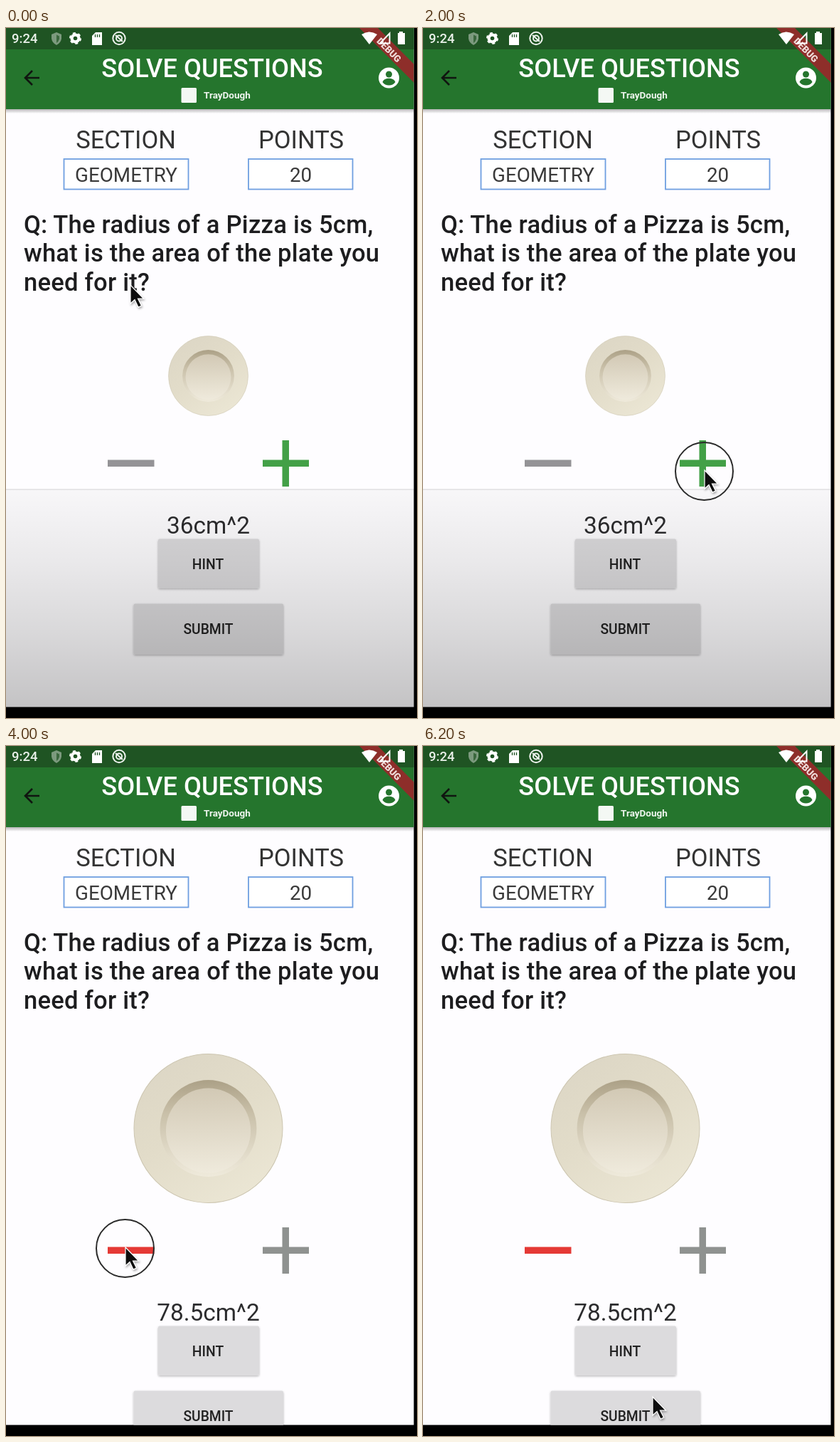
Recreate the animation shown at these times as an HTML page. Size 578 px wide and 969 px high, loop 6.3 s.

```html
<!DOCTYPE html>
<html lang="en">
<head>
<meta charset="utf-8">
<title>Solve questions</title>
<style>
  html, body { margin: 0; width: 100%; height: 100%; overflow: hidden; background: #000; }
  svg { display: block; width: 578px; height: 969px; font-family: Roboto, sans-serif; }
  #app { filter: blur(.55px); }
  .mid { text-anchor: middle; }
  .med { font-weight: 500; }
  .label { font-size: 34.6px; fill: #333; }
  .field { font-size: 27.8px; fill: #3a3a3a; }
  .box { fill: #fff; stroke: #6f9fe0; stroke-width: 1.8; }
  .question { font-size: 34.6px; letter-spacing: .22px; fill: #1d1d1f; }
  .area { font-size: 33.4px; fill: #2c2c2e; }
  .button { font-size: 19.3px; fill: #222; }
</style>
</head>
<body>
<svg viewBox="0 0 578 969">
  <defs>
    <linearGradient id="rim" x1=".1" y1="0" x2=".7" y2="1">
      <stop offset="0" stop-color="#dcd6c5"/>
      <stop offset=".5" stop-color="#e2dcc9"/>
      <stop offset="1" stop-color="#ebe6d4"/>
    </linearGradient>
    <linearGradient id="wall" x1="0" y1="0" x2="0" y2="1">
      <stop offset="0" stop-color="#aca187"/>
      <stop offset=".35" stop-color="#c9c0a9"/>
      <stop offset="1" stop-color="#efeadb"/>
    </linearGradient>
    <linearGradient id="well" x1="0" y1="0" x2="0" y2="1">
      <stop offset="0" stop-color="#d2c9b5"/>
      <stop offset="1" stop-color="#efeadc"/>
    </linearGradient>
    <linearGradient id="dim" x1="0" y1="0" x2="0" y2="1">
      <stop offset="0" stop-opacity=".025"/>
      <stop offset=".33" stop-opacity=".08"/>
      <stop offset=".65" stop-opacity=".145"/>
      <stop offset="1" stop-opacity=".23"/>
    </linearGradient>
    <linearGradient id="drop" x1="0" y1="0" x2="0" y2="1">
      <stop offset="0" stop-opacity=".28"/>
      <stop offset="1" stop-opacity="0"/>
    </linearGradient>
    <filter id="lift" x="-10%" y="-10%" width="120%" height="130%">
      <feDropShadow dx="0" dy="1.500" stdDeviation="1.5" flood-opacity=".3"/>
    </filter>
    <filter id="soft" x="-50%" y="-50%" width="200%" height="200%">
      <feDropShadow dx="1" dy="2" stdDeviation="1.5" flood-opacity=".35"/>
    </filter>
    <clipPath id="screen"><rect width="573.500" height="953.500"/></clipPath>
  </defs>

  <g id="app"><g clip-path="url(#screen)">
    <rect width="574" height="954" fill="#fefdff"/>
    <rect y="114" width="574" height="6" fill="url(#drop)"/>

    <text class="mid label" x="168.5" y="168.5">SECTION</text>
    <text class="mid label" x="415" y="168.5">POINTS</text>
    <rect class="box" x="81.5" y="184" width="175" height="42.5"/>
    <rect class="box" x="341" y="184" width="146.500" height="42.5"/>
    <text class="mid field" x="169" y="216">GEOMETRY</text>
    <text class="mid field" x="414.500" y="216">20</text>
    <g class="med question">
      <text x="25" y="287.500">Q: The radius of a Pizza is 5cm,</text>
      <text x="25" y="328">what is the area of the plate you</text>
      <text x="25" y="368.500">need for it?</text>
    </g>

    <g id="plate">
      <circle r="100" fill="url(#rim)" stroke="#cdc6b1" stroke-width="1"/>
      <circle r="65" fill="url(#wall)"/>
      <circle cy="3" r="57" fill="url(#well)"/>
    </g>

    <g id="controls">
      <circle id="ripple" cy="611.500"/>
      <path id="minus" d="M143 606.500h65.500v9.500h-65.500z"/>
      <path id="plus" d="M361 606.500h27.500v-27.500h9.500v27.500h28v9.500h-28v28h-9.500v-28h-27.500z"/>
      <text id="area" class="mid area" x="284.500" y="710"></text>
      <g fill="#dcdbdd" filter="url(#lift)">
        <rect x="214" y="717.500" width="142" height="69" rx="2"/>
        <rect x="179.500" y="808.500" width="210.500" height="71" rx="2"/>
      </g>
      <text class="mid med button" x="284" y="760">HINT</text>
      <text class="mid med button" x="284.500" y="850.500">SUBMIT</text>
    </g>

    <g id="shade">
      <rect y="648" width="574" height="306" fill="url(#dim)"/>
      <path d="M0 648h574" stroke="#000" stroke-opacity=".17"/>
    </g>

    <rect width="574" height="114" fill="#25752d"/>
    <rect width="574" height="30" fill="#1f5423"/>
    <text class="mid med" x="290" y="69" font-size="36.200" fill="#fff">SOLVE QUESTIONS</text>
    <rect x="246.500" y="84" width="21.500" height="21" rx="1.500" fill="#f4f8f4"/>
    <text x="278" y="98.500" font-size="13.500" font-weight="700" fill="#eef5ee">TrayDough</text>
    <path d="M47 70h-20m10-10l-10 10l10 10" fill="none" stroke="#101510" stroke-width="2.600"/>
    <circle cx="538.500" cy="70" r="14.500" fill="#fff"/>
    <circle cx="538.500" cy="65" r="4.500" fill="#25752d"/>
    <path d="M529.500 76c2-7 16-7 18 0c-4 6-14 6-18 0z" fill="#25752d"/>

    <path d="M497 0h26l51 51v26z" fill="#8e2e2a"/>
    <text class="mid" transform="translate(538.500 31) rotate(45)" y="4.500" font-size="13.200" font-weight="800" fill="#f0dcda">DEBUG</text>

    <g fill="#fff">
      <text class="med" x="8" y="21" font-size="18.500" fill="#e9f0e9">9:24</text>
      <path d="M71 6l7 3v6q-1 6-7 9q-6-3-7-9v-6z" fill="#7c9a7e"/>
      <path d="M71 9.500l4 2v4q-1 3.500-4 5.500z" fill="#3b683e"/>
      <circle cx="97.500" cy="14.500" r="7" stroke="#fff" stroke-width="3" stroke-dasharray="3.700 3.630"/>
      <circle cx="97.500" cy="14.500" r="2.800" fill="#1f5423"/>
      <path d="M126 6h9v18h-14v-13z"/>
      <path d="M125.500 9v4m3-4v4m3-4v4" stroke="#1f5423" stroke-width="1.300"/>
      <g fill="none" stroke="#eef3ee" stroke-width="2">
        <circle cx="159" cy="14.500" r="8.700"/>
        <circle cx="159" cy="14.500" r="4"/>
        <path d="M154 10l10 9"/>
      </g>
      <path d="M500 9q11-7 22 0l-11 14z"/>
      <path d="M526 21.500l13.500-14v14z" fill="none" stroke="#fff" stroke-width="2"/>
      <path d="M553 5h5v2h3v16h-10v-16h2z"/>
    </g>
  </g></g>

  <g id="bezel">
    <circle r="112"/>
    <path d="M-26-35l57 35l-57 35z" fill="#fff" fill-opacity=".75"/>
  </g>
  <g id="cursor">
    <circle id="ring" cx="-.5" cy="1.500" r="40.500" fill="none" stroke="#2a2a2a" stroke-width="2"/>
    <path d="M0 0v26l6-5.500l5 10.500l4.500-2l-5-10h8z" fill="#0c0c0c" stroke="#fff" stroke-width="1.200" filter="url(#soft)"/>
  </g>
</svg>

<script>
  const LOOP = 6300, STEP = 100, FADE = 700;
  const $ = id => document.getElementById(id);
  const set = (id, attrs) => {
    for (const key in attrs) $(id).setAttribute(key, attrs[key]);
  };
  const show = (id, on) => { $(id).style.display = on ? '' : 'none'; };

  const sizes = [
    { width: 112, area: '36' },
    { width: 143, area: '49' },
    { width: 175, area: '64' },
    { width: 209, area: '78.5' }
  ];
  // [time, index into sizes]
  const changes = [[0, 0], [2100, 1], [2600, 2], [3200, 3], [4300, 2], [5300, 3]];
  // [time, centre of the pressed button]
  const clicks = [[2000, 393.5], [2500, 393.5], [3100, 393.5], [4100, 175], [5200, 393.5]];
  // [time, x, y]
  const path = [
    [0, 175, 361], [700, 121, 381], [900, 125, 388], [1700, 395, 618],
    [2000, 396, 621], [2400, 389, 648], [2700, 386, 656], [3100, 393, 673],
    [3500, 395, 675], [4000, 168, 704], [4600, 160, 710], [4700, 164, 709],
    [5100, 391, 672], [5400, 392, 674], [6100, 323, 914], [6300, 323, 914]
  ];

  const last = (list, t) => list.filter(item => item[0] <= t).pop();

  function pointer(t) {
    const i = path.findIndex(p => p[0] > t);
    const a = path[i - 1], b = path[i];
    const u = (t - a[0]) / (b[0] - a[0]), e = u * u * (3 - 2 * u);
    return [a[1] + (b[1] - a[1]) * e, a[2] + (b[2] - a[2]) * e];
  }

  function drawRipple(t, level) {
    const click = last(clicks, t);
    const age = click ? t - click[0] : LOOP;
    const disabled = level === 3 && click && click[1] > 300;
    show('ripple', age < FADE && !disabled);
    if (age < FADE) {
      set('ripple', {
        cx: click[1],
        r: 93 * Math.min(1, (age / 220) ** 0.4),
        'fill-opacity': 0.075 * (1 - age / 1000)
      });
    }
  }

  function drawBezel(t) {
    const p = (t - 530) / 500;
    show('bezel', p >= 0 && p < 1);
    set('bezel', {
      transform: `translate(284 507) scale(${0.75 * (1 + p)})`,
      opacity: 1 - p
    });
    $('bezel').firstElementChild.setAttribute('fill-opacity', 0.32);
  }

  function draw(t) {
    const level = last(changes, t)[1];
    const { width, area } = sizes[level];
    const r = width / 2;
    set('plate', { transform: `translate(284.5 ${432.5 + r}) scale(${r / 100})` });
    set('controls', { transform: `translate(0 ${width - 112})` });
    set('minus', { fill: level === 0 ? '#949396' : '#e53935' });
    set('plus', { fill: level === 3 ? '#8f9290' : '#43a047' });
    $('area').textContent = area + 'cm^2';

    drawRipple(t, level);
    drawBezel(t);
    show('shade', t < 3500);
    show('ring', clicks.some(([at]) => t >= at - STEP && t < at + STEP));
    set('cursor', { transform: `translate(${pointer(t)})` });
  }

  const start = performance.now();
  function tick() {
    const t = (performance.now() - start) % LOOP;
    draw(Math.floor(t / STEP) * STEP);
    requestAnimationFrame(tick);
  }
  tick();
</script>
</body>
</html>
```
